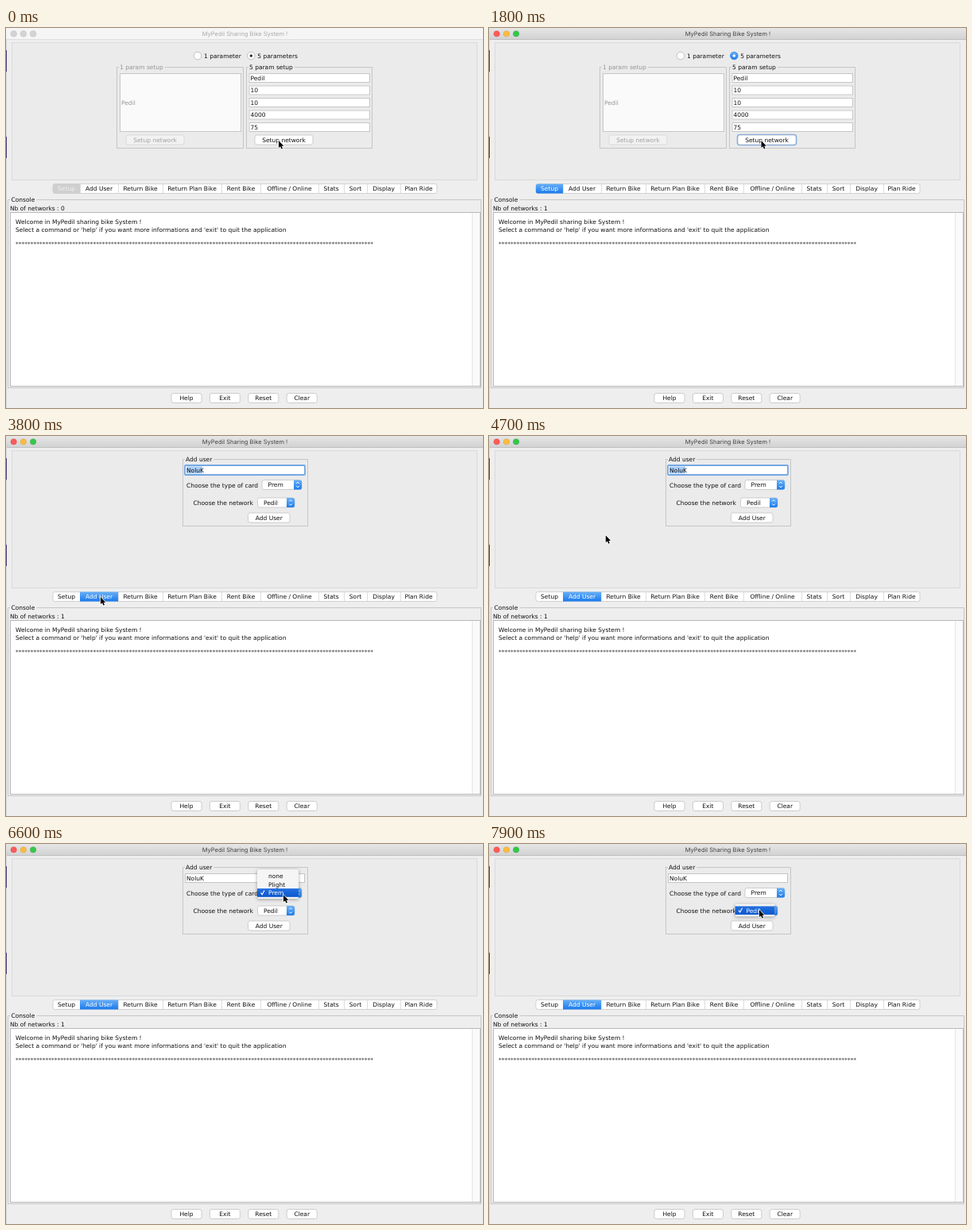
These frames come from a looping animation (600 by 479 pixels, 8 s). An HTML page with a canvas:

```html
<!DOCTYPE html>
<html lang="en">
<head>
<meta charset="utf-8">
<title>Bike sharing console</title>
<style>
  html, body { margin: 0; height: 100%; overflow: hidden; background: #eee; }
  canvas { display: block; width: 600px; height: 479px; }
</style>
</head>
<body>
<canvas width="600" height="479"></canvas>
<script>
const ctx = document.querySelector('canvas').getContext('2d');
const LOOP = 8000;
const UI_FONT = '7.5px "DejaVu Sans", sans-serif';
const TITLE_FONT = '7.5px Inter, sans-serif';
const PANEL = '#ebebec', LINE = '#c6c6c6', DIM = '#959595';

const TABS = ['Setup', 'Add User', 'Return Bike', 'Return Plan Bike', 'Rent Bike',
  'Offline / Online', 'Stats', 'Sort', 'Display', 'Plan Ride'];
const TAB_EDGES = [59, 93, 141, 197, 271, 320, 393, 425, 454, 496, 542];

// Pointer keys: time, x, y
const POINTER = [
  [0, 343, 142], [100, 342.5, 142], [2600, 342.5, 142], [2800, 245, 170], [3000, 114, 230],
  [3200, 114, 226], [3500, 119, 203], [3800, 119, 203], [4200, 31, 220], [4300, 31, 220],
  [4500, 70, 180], [5000, 262, 43], [5100, 262, 43], [5400, 335, 79], [5700, 354, 63],
  [6000, 353, 64], [6300, 347, 51], [6600, 349, 64], [6900, 350, 77], [7000, 350, 80],
  [7400, 346, 85], [7800, 341, 83], [7900, 340, 83]
];

function pointerAt(t) {
  const next = POINTER.findIndex(key => key[0] > t);
  if (next < 0) return POINTER[POINTER.length - 1].slice(1);
  const [t0, x0, y0] = POINTER[next - 1], [t1, x1, y1] = POINTER[next];
  const k = (t - t0) / (t1 - t0);
  return [x0 + (x1 - x0) * k, y0 + (y1 - y0) * k];
}

function text(string, x, middle, color = '#111', align = 'left', font = UI_FONT) {
  ctx.font = font;
  ctx.textAlign = align;
  ctx.fillStyle = color;
  ctx.fillText(string, x, middle + 2.8);
}

function rect(x, y, w, h, fill, stroke) {
  if (fill) { ctx.fillStyle = fill; ctx.fillRect(x, y, w, h); }
  if (stroke) { ctx.strokeStyle = stroke; ctx.lineWidth = 1; ctx.strokeRect(x + .5, y + .5, w - 1, h - 1); }
}

function rounded(x, y, w, h, r, fill, stroke, width = .7) {
  ctx.beginPath();
  ctx.roundRect(x, y, w, h, r);
  if (fill) { ctx.fillStyle = fill; ctx.fill(); }
  if (stroke) { ctx.strokeStyle = stroke; ctx.lineWidth = width; ctx.stroke(); }
}

function disc(x, y, r, fill, stroke) {
  ctx.beginPath();
  ctx.arc(x, y, r, 0, 7);
  ctx.fillStyle = fill;
  ctx.fill();
  if (stroke) { ctx.strokeStyle = stroke; ctx.lineWidth = .7; ctx.stroke(); }
}

function polyline(points, color, width) {
  ctx.beginPath();
  points.forEach(([x, y]) => ctx.lineTo(x, y));
  ctx.strokeStyle = color;
  ctx.lineWidth = width;
  ctx.stroke();
}

function shade(y, h, top, bottom) {
  const gradient = ctx.createLinearGradient(0, y, 0, y + h);
  gradient.addColorStop(0, top);
  gradient.addColorStop(1, bottom);
  return gradient;
}
const blue = (y, h) => shade(y, h, '#6ab1f8', '#1d7cee');

function button(label, x, y, w, { h = 12, state = '' } = {}) {
  const off = state === 'off', down = state === 'down';
  if (state === 'focus') rounded(x - .3, y - .3, w + .6, h + .6, 3, null, '#74a9e6', 2);
  rounded(x, y, w, h, 2.5, down ? blue(y, h) : off ? '#f2f2f2' : '#fff', off ? '#d2d2d2' : '#bcbcbc');
  text(label, x + w / 2, y + h / 2, down ? '#fff' : off ? '#a0a0a0' : '#111', 'center');
}

function group(label, x, y, w, h, color) {
  rect(x, y, w, h, null, LINE);
  ctx.font = UI_FONT;
  rect(x + 3, y - 3, ctx.measureText(label).width + 3, 8, PANEL);
  text(label, x + 4, y + .5, color);
}

function field(value, x, middle, w, focused) {
  rect(x, middle - 6, w, 12, '#fff', LINE);
  if (focused) rounded(x, middle - 6, w, 12, 1, null, '#75a9e4', 1.8);
  text(value, x + 2, middle);
}

function radio(label, x, selected, active) {
  const on = selected && active;
  disc(x, 35, 4.8, on ? blue(30, 10) : '#fff', on ? '#2b7de0' : '#aaa');
  if (selected) disc(x, 35, 1.8, on ? '#fff' : '#333');
  text(label, x + 8, 35);
}

function combo(value, x, y, w) {
  rounded(x, y, w, 12, 2.5, '#fff', '#bcbcbc');
  const right = x + w, mid = right - 5;
  rounded(right - 10, y, 10, 12, [0, 2.5, 2.5, 0], blue(y, 12));
  for (const s of [-1, 1])
    polyline([[mid - 1.8, y + 6 + s * 1.5], [mid, y + 6 + s * 3.4], [mid + 1.8, y + 6 + s * 1.5]], '#fff', 1);
  text(value, x + 7.5, y + 6);
}

function popup(items, x, y, w, h, hover, checked) {
  ctx.save();
  ctx.shadowColor = 'rgba(0,0,0,.35)';
  ctx.shadowBlur = 4;
  ctx.shadowOffsetY = 1;
  rounded(x, y, w, h, 2, '#f5f5f5');
  ctx.restore();
  items.forEach((item, i) => {
    const middle = y + 8 + i * 10.7, color = i === hover ? '#fff' : '#111';
    if (i === hover) rect(x, middle - 5.3, w, 10.7, shade(middle - 5, 10, '#246fdf', '#0a58ce'));
    if (i === checked)
      polyline([[x + 4.5, middle], [x + 6.2, middle + 2.3], [x + 9, middle - 3]], color, 1.1);
    text(item, x + 14, middle, color);
  });
}

function setupPage(active, pressed, focused) {
  radio('1 parameter', 241, false, active);
  radio('5 parameters', 308.3, true, active);
  group('1 param setup', 139, 49, 160, 103, DIM);
  rect(143, 57, 153, 74, '#fafafa', LINE);
  text('Pedil', 145, 94, DIM);
  button('Setup network', 151, 135, 73, { state: 'off' });
  group('5 param setup', 302, 49, 159, 103);
  ['Pedil', '10', '10', '4000', '75'].forEach((value, i) => field(value, 305.5, 63 + i * 15.5, 152.5));
  button('Setup network', 313, 135, 73, { state: pressed ? 'down' : focused ? 'focus' : '' });
}

function userPage(t, y) {
  const cardOpen = t >= 5900 && t < 7000, networkOpen = t >= 7600;
  group('Add user', 222, 29, 158, 85);
  field('', 225, 43, 151, t < 5900);
  if (t < 5000) rect(227, 38.5, 20, 9, '#a9cdf8');
  text('NoluK', 227, 43);
  text('Choose the type of card', 227, 62);
  combo('Prem', 322, 55.5, 50);
  text('Choose the network', 235.5, 84);
  combo('Pedil', 316.5, 78, 46.5);
  button('Add User', 304.5, 97, 52.5);
  if (cardOpen) popup(['none', 'Plight', 'Prem'], 316, 32, 52, 37, y > 69 ? -1 : y < 56 ? 1 : 2, 2);
  if (networkOpen) popup(['Pedil'], 309.5, 75.7, 50, 15.5, 0, 0);
}

function windowFrame(active, networks, tab) {
  rect(0, 0, 600, 479, '#eeeeee');
  rect(0, 0, 600, 14, active ? shade(0, 14, '#e7e6e7', '#d3d2d3') : '#f5f5f5');
  rect(0, 14, 600, 1, active ? '#c0c0c0' : '#dedede');
  const lights = active ? ['#fc5b57', '#fdbc40', '#34c84a'] : Array(3).fill('#d3d3d3');
  lights.forEach((color, i) => disc(9.7 + i * 12.2, 7.3, 3.8, color, active ? 'rgba(0,0,0,.12)' : '#c6c6c6'));
  text('MyPedil Sharing Bike System !', 300.5, 7.2, active ? '#444' : '#aaa', 'center', TITLE_FONT);
  rect(0, 14, 1, 465, '#d6d6d6');
  for (const y of [28, 137]) rect(0, y, 1, 27, '#44366f');

  rect(7, 18, 586, 174, PANEL, '#dadada');
  rounded(59, 196.5, 483, 12, 2.5, '#fff', '#c2c2c2');
  TABS.forEach((name, i) => {
    const x = TAB_EDGES[i], w = TAB_EDGES[i + 1] - x, selected = i === tab;
    if (selected) rounded(x, 196.5, w, 12, i ? 0 : [2.5, 0, 0, 2.5], active ? blue(196, 12) : '#cfcfcf');
    else if (i) rect(x, 197, .7, 11, '#cfcfcf');
    text(name, x + w / 2, 202.3, selected ? (active ? '#fff' : '#f1f1f1') : '#111', 'center');
  });

  rect(2, 216, 596, 238, null, LINE);
  rect(5, 212, 34, 8, '#eeeeee');
  text('Console', 6.5, 216.5);
  text('Nb of networks : ' + networks, 5, 227);
  rect(5, 232, 592, 220, '#fff', '#b9b9b9');
  rect(586, 233, 10, 218, '#fafafa');
  rect(586, 233, 1, 218, '#e6e6e6');
  text('Welcome in MyPedil sharing bike System !', 12, 244);
  text("Select a command or 'help' if you want more informations and 'exit' to quit the application", 12, 253.7);
  text('*'.repeat(120), 12, 272.4, '#333');
  ['Help', 'Exit', 'Reset', 'Clear'].forEach((name, i) => button(name, 208 + i * 48.4, 460.5, 38));
}

function pointer(x, y, inField) {
  ctx.save();
  ctx.translate(x, y);
  if (inField) {
    polyline([[-1.5, -4.5], [0, -4], [1.5, -4.5]], '#222', .8);
    polyline([[0, -4], [0, 4]], '#222', .8);
    polyline([[-1.5, 4.5], [0, 4], [1.5, 4.5]], '#222', .8);
  } else {
    const arrow = new Path2D('M0 0V9L2 7.2 3.5 10.5 5 9.8 3.6 6.7H6.4Z');
    ctx.strokeStyle = '#fff';
    ctx.lineWidth = 1.3;
    ctx.stroke(arrow);
    ctx.fillStyle = '#000';
    ctx.fill(arrow);
  }
  ctx.restore();
}

function draw(t) {
  const active = t >= 1600, switched = t >= 3500, onUser = t >= 3600;
  const [x, y] = pointerAt(t);
  windowFrame(active, t >= 1800 ? 1 : 0, switched ? 1 : 0);
  if (onUser) userPage(t, y);
  else setupPage(active, t >= 1700 && t < 1800, active && !switched);
  pointer(x, y, onUser && t < 5900 && x > 226 && x < 375 && y > 37 && y < 49);
}

ctx.textRendering = 'geometricPrecision';
const start = performance.now();
function tick() {
  // The picture advances in steps of a tenth of a second
  draw(Math.floor((performance.now() - start) % LOOP / 100) * 100);
  requestAnimationFrame(tick);
}
tick();
</script>
</body>
</html>
```
